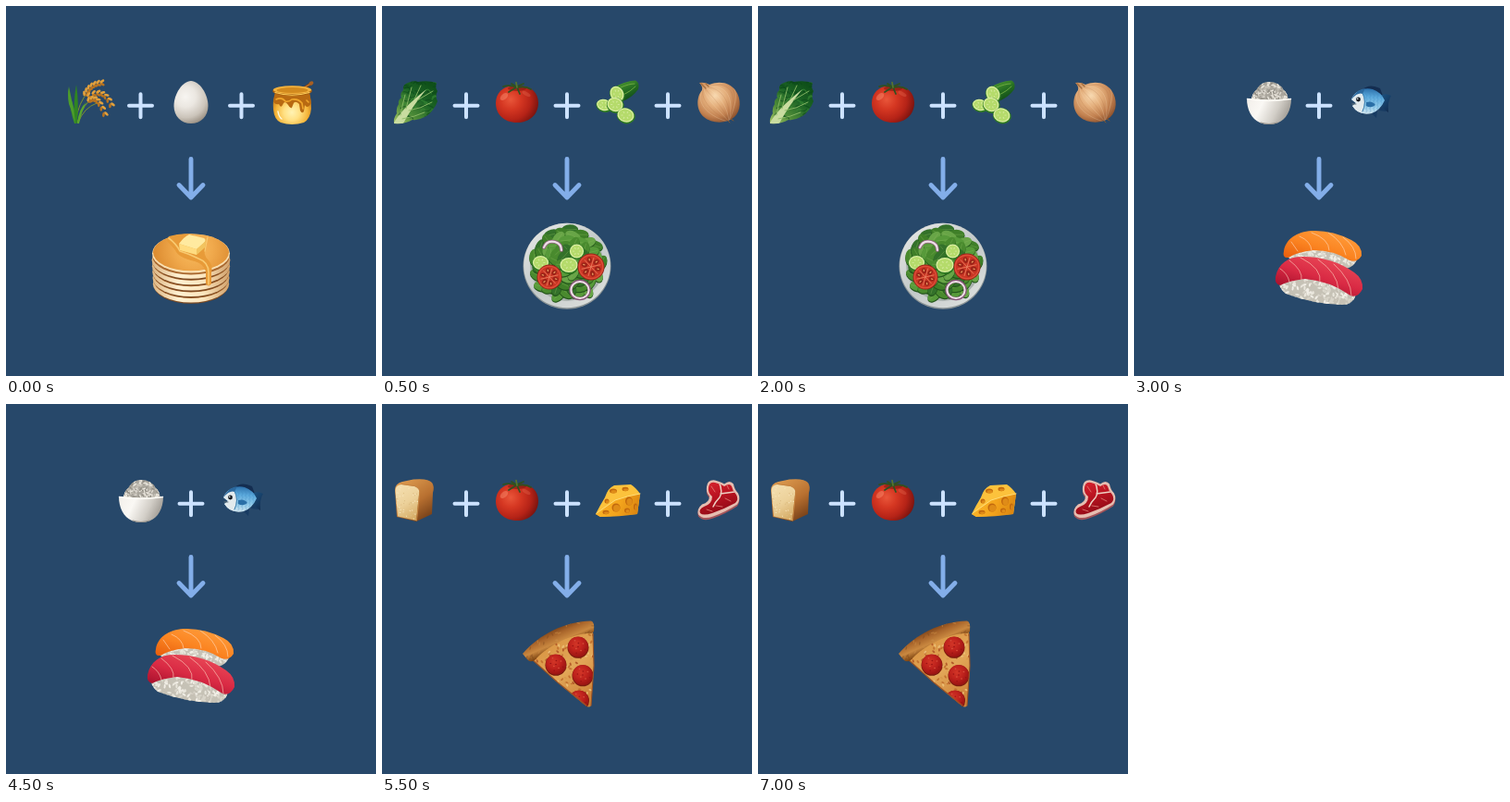
Recreate the animation shown at these times as an HTML page with a canvas. Size 400x400 px, loop 8 s.

```html
<!DOCTYPE html>
<html lang="en">
<head>
<meta charset="utf-8">
<title>Recipes</title>
<style>
html, body { margin: 0; width: 100%; height: 100%; overflow: hidden; background: #27486a; }
canvas { display: block; width: 400px; height: 400px; }
</style>
</head>
<body>
<canvas id="stage" width="400" height="400"></canvas>
<script>
const ctx = document.getElementById('stage').getContext('2d');
const TAU = Math.PI * 2;
let seed = 1;

function rnd(a = 0, b = 1) {
  seed = (seed * 16807) % 2147483647;
  return a + (b - a) * seed / 2147483647;
}

function addStops(g, colors) {
  colors.forEach((c, i) => g.addColorStop(i / (colors.length - 1), c));
  return g;
}
const linear = (x1, y1, x2, y2, ...c) => addStops(ctx.createLinearGradient(x1, y1, x2, y2), c);
const radial = (x, y, r, ...c) => addStops(ctx.createRadialGradient(x, y, 0, x, y, r), c);

function fill(d, color) {
  ctx.fillStyle = color;
  ctx.fill(new Path2D(d));
}

function line(d, color, width = 1) {
  ctx.strokeStyle = color;
  ctx.lineWidth = width;
  ctx.lineCap = ctx.lineJoin = 'round';
  ctx.stroke(new Path2D(d));
}

function oval(x, y, rx, ry, color, turn = 0) {
  ctx.beginPath();
  ctx.ellipse(x, y, rx, ry, turn, 0, TAU);
  ctx.fillStyle = color;
  ctx.fill();
}

function ring(x, y, rx, ry, color, width) {
  ctx.beginPath();
  ctx.ellipse(x, y, rx, ry, 0, 0, TAU);
  ctx.strokeStyle = color;
  ctx.lineWidth = width;
  ctx.stroke();
}

function inside(d, draw) {
  ctx.save();
  ctx.clip(new Path2D(d));
  draw();
  ctx.restore();
}

// Scatters small ovals over a box.
function grains(n, [x1, y1, x2, y2], rx, ry, colors) {
  for (let i = 0; i < n; i++) {
    oval(rnd(x1, x2), rnd(y1, y2), rx, ry, colors[i % colors.length], rnd(0, 3.1));
  }
}

function plus(x) {
  line(`M${x - 12.5} 107.8h25M${x} 95.3v25`, '#cce2ff', 4);
}

function arrow() {
  line('M200 165.5V206.5M187 193.5L200 207L213 193.5', '#83aee9', 4.9);
}

function wheat() {
  line('M75 126Q78 104 90 91M77 126Q83 106 96 97M78 126Q84 110 98 105', '#7d8f30', 1);
  fill('M74 127Q69 113 69 98Q75 110 76 127Z', '#3f9427');
  fill('M75 127Q72 106 76 85Q79 105 77 126Z', '#2f8521');
  fill('M77 127Q79 110 87 104Q82 113 79 127Z', '#58a72e');
  fill('M68 106Q66 96 68 87Q72 105 75 125Z', '#4d9d2b');
  const heads = [[86, 95, 91, 84, 104, 83], [90, 97, 106, 88, 114, 107], [90, 102, 99, 95, 107, 117]];
  for (const [x1, y1, cx, cy, x2, y2] of heads) {
    for (let i = 0; i <= 6; i++) {
      const t = i / 6, u = 1 - t;
      const x = u * u * x1 + 2 * u * t * cx + t * t * x2;
      const y = u * u * y1 + 2 * u * t * cy + t * t * y2;
      const turn = Math.atan2(u * (cy - y1) + t * (y2 - cy), u * (cx - x1) + t * (x2 - cx));
      const dx = -Math.sin(turn) * 1.6, dy = Math.cos(turn) * 1.6;
      oval(x + dx, y + dy, 2.7, 1.4, '#b87320', turn + 0.5);
      oval(x - dx, y - dy, 2.8, 1.4, '#e3a13c', turn - 0.5);
    }
  }
}

function egg() {
  const shell = 'M200 81C209 81 218.5 95 218.5 108C218.5 119.5 210.5 127 200 127C189.5 127 181.5 119.5 181.5 108C181.5 95 191 81 200 81Z';
  fill(shell, radial(194, 98, 34, '#f7f5f1', '#ebe7e1', '#cbc4ba', '#857a6c'));
}

function honey() {
  line('M317 92L330 83.5', '#7e4215', 3);
  line('M318 91L331 83', '#c17a30', 1.4);
  oval(330, 83.5, 2.6, 2, '#a85f22', -0.6);
  const pot = 'M291 94Q288 102 289 112Q290 123 297 126Q309 130 322 126Q329 122 330 111Q330 101 328 94Z';
  fill(pot, radial(309, 115, 26, '#fff3b4', '#ffe083', '#f5b438', '#b0620c'));
  fill('M291 94Q309 101 328 94L330 105Q326 112 323 107L322 114Q320 117 318 113L317 106Q313 102 311 105L309 110Q307 111 305 107Q301 101 299 107Q297 111 295 106Q291 107 289 103Z', '#b86a12');
  line('M292 101Q298 98 302 103Q306 104 309 101Q316 100 320 105L321 111M325 102L327 104', '#f0a62b', 1.6);
  oval(309.5, 92, 21.3, 5.4, '#a95f10');
  oval(309.5, 90.6, 20.6, 4.4, '#f3b23d');
  oval(309.5, 91, 17, 3, '#d28a1e');
  line('M291 93.5Q309 99 328 93.5', '#ffd05a', 1.2);
  line('M294 114Q295 120 298 122', '#fffbe0', 1.4);
}

function pancakes() {
  for (let i = 4; i >= 0; i--) {
    const y = 270 + i * 6.4, rx = 42 - i * 0.3;
    oval(200, y + 6.2, rx - 0.6, 20, '#7d4a22');
    oval(200, y + 4.8, rx + 0.4, 20, linear(158, 0, 242, 0, '#dcb583', '#fff1d2', '#fbe6bf', '#d0a06a'));
    oval(200, y + 0.8, rx - 0.4, 19.6, '#a9682f');
  }
  oval(200, 267.5, 42, 21, '#f9e0b2');
  oval(200, 266.3, 41, 20, radial(203, 262, 42, '#f8bd60', '#f0a94c', '#dd8d32'));
  fill('M176 249Q190 245 202 247L216 262Q212 268 219 275Q224 281 222 288V300Q219 305 216 300V287Q214 279 204 276Q186 272 183 264Q180 260 174 254Z', '#e89b38');
  line('M176 251Q184 257 188 265Q198 268 208 273Q219 277 219 288V301', '#f9ca70', 1.6);
  line('M218 250Q216 259 215 265', '#f9ca70', 1.2);
  fill('M187 258L196 248L216 252L215 261L206 269L188 264Z', '#eab653');
  fill('M187 257Q193 249 198 247L214 251Q217 253 214 256L206 263Z', '#ffeaa0');
  fill('M187 257L206 263V269L188 264Z', '#ffdc80');
  fill('M206 263L216 254L215 261L206 269Z', '#f2c45f');
}

function lettuce() {
  const leaf = 'M13 127Q12 122 16 116Q15 111 18 106Q17 102 21 99Q19 94 23 91Q22 85 28 83Q34 80 39 82Q49 80 59 83Q57 88 60 92Q57 98 60 103Q58 109 55 112Q52 117 46 120Q39 124 33 123Q25 128 13 127Z';
  fill(leaf, linear(14, 127, 50, 83, '#a5c468', '#4c8a37', '#1c6425', '#0f5019'));
  inside(leaf, () => {
    for (let i = 0; i < 55; i++) {
      const x = rnd(18, 58), y = rnd(82, 120);
      line(`M${x} ${y}q3 ${rnd(-5, 2)} 6 ${rnd(-3, 3)}`, i % 3 ? '#0b471a88' : '#3d903899', 1.3);
    }
    fill('M12 128Q20 112 48 90Q33 108 23 127Z', '#c9dca0');
    line('M20 118Q22 107 25 96M26 111Q29 99 32 88M35 101L42 86M22 122Q35 120 46 115M29 113Q42 111 54 104M38 102L55 92', '#8dba68', 0.9);
  });
}

function tomato() {
  const body = 'M146 87.5C158 84 169 92 169 104.500C169 118 159 126 146 126C132 126 123 117 123 105C123 92 134 84 146 87.5Z';
  fill(body, radial(139, 101, 33, '#e9563a', '#d53722', '#b52317', '#6d100d'));
  oval(132, 98, 5, 3, '#ff9c7a66', -0.7);
  oval(156, 95, 5, 2, '#f5806044', 0.5);
  oval(146, 89, 10, 3, '#76160f88');
  line('M146 88Q138 85 131 87M145 88L137 93M146 88L149 95M147 88Q155 86 161 90M146 87L153 84M145 87L140 84', '#2f5120', 1.8);
  line('M146 88L145 82.5', '#58752f', 1.7);
}

function slice(x, y, rx, ry = rx, turn = 0) {
  oval(x + 0.3, y + 0.8, rx, ry, '#2f7a22', turn);
  oval(x, y, rx - 0.9, ry - 0.9, '#dcefa2', turn);
  oval(x, y, rx - 2.2, ry - 2.2, '#b5db6b', turn);
  for (let i = 0; i < 6; i++) {
    const a = i * TAU / 6;
    oval(x + Math.cos(a) * rx * 0.4, y + Math.sin(a) * ry * 0.4, 1.2, 0.6, '#d3e99c', a);
  }
}

function cucumber() {
  fill('M249 89Q262 81 274 80.5Q279 83 277 90Q271 99 258 104Z', linear(258, 82, 267, 101, '#4c982f', '#266f22', '#124f18'));
  line('M258 88Q267 84 273 84M261 96Q269 92 274 87', '#72ad45', 0.9);
  slice(254, 95, 8, 9.5, -0.5);
  slice(240, 107, 9, 7, 0.25);
  slice(252, 106.5, 9.5, 8.5, 0.3);
  slice(263.5, 118, 10, 8.5, 0.25);
}

function onion() {
  const body = 'M343 83Q349 82 354 85C366 80 377 84 382 91C389 101 388 113 381 120C372 128 356 127 348 120C339 112 340 98 346 91Q347 87 343 83Z';
  fill(body, radial(360, 97, 34, '#f8d9b0', '#e4af7c', '#c28150', '#784020'));
  inside(body, () => {
    for (let i = -4; i <= 5; i++) {
      line(`M348 88C${359 + i * 6} ${90 - i * 4} ${374 + i * 4} ${106 - i * 4} 375 125`, i % 2 ? '#a0653b44' : '#fbe1bd55', 0.7);
    }
  });
  line('M345 84L350 89M350 84L353 87', '#a46d3c', 1.2);
  line('M374 124l2 2M377 122l3 2', '#83572f', 1);
}

function tomatoSlice(x, y, r) {
  oval(x, y, r, r, '#9c2118');
  oval(x, y, r - 0.9, r - 0.9, '#dd4f38');
  oval(x, y, r - 2.4, r - 2.4, '#c93524');
  for (let i = 0; i < 6; i++) {
    const a = i * TAU / 6 + 0.3;
    oval(x + Math.cos(a) * r * 0.52, y + Math.sin(a) * r * 0.52, r * 0.23, r * 0.17, '#9b2318', a);
    oval(x + Math.cos(a) * r * 0.55, y + Math.sin(a) * r * 0.55, 1.4, 0.7, '#e99a5f', a);
    line(`M${x} ${y}l${Math.cos(a + 0.52) * r * 0.7} ${Math.sin(a + 0.52) * r * 0.7}`, '#e97c5c', 0.9);
  }
}

function salad() {
  oval(200, 281.3, 47.5, 46.5, '#8b9496');
  oval(200, 280.5, 46.8, 45.8, linear(165, 240, 232, 324, '#e4e6e4', '#c2c8c8', '#dde0de'));
  oval(200, 280, 40, 39, '#a8b1ad');
  oval(200, 279, 37, 37, '#376f24');
  const greens = ['#3f7f28', '#579a3a', '#33712a', '#68a547', '#498a2e'];
  for (let i = 0; i < 65; i++) {
    const a = i * 2.4, d = 37 * Math.sqrt(1 - i / 65);
    const x = 200 + Math.cos(a) * d, y = 278 + Math.sin(a) * d;
    const turn = rnd(0, TAU), dx = Math.cos(turn) * 7, dy = Math.sin(turn) * 7;
    oval(x, y + 1.2, 9, 5.5, '#24561c', turn);
    oval(x, y, 9, 5.4, greens[i % 5], turn);
    line(`M${x - dx} ${y - dy}L${x + dx} ${y + dy}`, '#86b65a77', 0.8);
  }
  line('M175 261Q178 253 187 255Q194 257 194 264', '#996589', 3.7);
  line('M175 261Q178 253 187 255Q194 257 194 264', '#eee1e8', 2.1);
  slice(210.5, 265, 8.5);
  slice(171.5, 277.5, 9.5, 8.5);
  slice(202, 280, 10.5, 9);
  tomatoSlice(181, 293, 13.5);
  tomatoSlice(226, 282, 14.5);
  ring(214, 307, 10, 9.5, '#88557a', 3.5);
  ring(214, 307, 9.6, 9, '#eee1e7', 2);
}

function riceBowl() {
  const mound = 'M127 102Q127 95 132 91Q137 82 146 82Q157 82 162 91Q166 94 167 102Z';
  fill(mound, '#aaa69d');
  inside(mound, () => grains(180, [127, 82, 167, 103], 2.1, 0.75, ['#dedad1', '#bfbab0', '#ece8df', '#8f8b82']));
  fill('M122 100Q146 103 170 100C170 113 164 123 156 126Q146 130 136 126C127 122 122 112 122 100Z',
    linear(122, 100, 169, 122, '#f2efea', '#faf8f4', '#d2cec7', '#938e87'));
  line('M122.5 100.5Q146 104 169.5 100.5', '#fffdf8', 1.4);
  line('M137 126Q146 129 155 126', '#9b968f', 1.2);
}

function fish() {
  fill('M246 91Q254 83 266 89L269 97Z', '#142d50');
  fill('M264 98Q271 93 278 97Q274 103 275 115Q269 112 265 105Z', linear(264, 98, 278, 111, '#1c5382', '#122d50'));
  fill('M255 114L262 121L263 113ZM266 108L273 114L265 113ZM244 113L247 118L252 114Z', '#183b62');
  const body = 'M235 101C240 90 250 88 258 90Q267 93 271 102Q266 113 257 116Q243 119 236 108L240 105Z';
  fill(body, linear(252, 88, 250, 118, '#2568a4', '#5ba9dc', '#90caea', '#dceaf0'));
  inside(body, () => {
    fill('M233 98Q240 91 247 94Q252 104 246 116H233Z', '#e2eaed');
    fill('M235 98Q242 88 250 89L247 95Q242 93 235 101Z', '#2c699e');
    for (let x = 251; x < 268; x += 4) for (let y = 95; y < 112; y += 4) {
      line(`M${x} ${y}q2.5 2 0 4`, '#367fb866', 0.7);
    }
  });
  line('M247 94Q252 104 247 114', '#397cad', 1);
  fill('M251 104Q258 102 261 107Q256 111 251 108Z', '#2a6fa7');
  oval(242.5, 101, 2.4, 2.4, '#111820');
  oval(241.8, 100.2, 0.8, 0.8, '#fff');
  line('M236 106L240 106', '#64747d', 1);
}

function sushiPiece(rice, top, box, colors, veins) {
  fill(rice, '#c6c2b6');
  inside(rice, () => grains(280, box, 2.4, 1.1, ['#e9e6dc', '#d9d5ca', '#f1eee6', '#c6c1b5']));
  fill(top, linear(box[0] + 35, box[1] - 25, box[0] + 22, box[1] + 19, ...colors));
  inside(top, () => line(veins, '#ffe0c8a0', 0.9));
}

function sushi() {
  sushiPiece('M165 262Q164 270 171 276L226 284Q238 284 242 271L235 260Z',
    'M162 265C164 252 176 244 192 243Q214 242 235 253Q247 259 246 270Q241 278 233 275Q216 264 194 264Q176 266 167 272Q160 273 162 265Z',
    [163, 261, 243, 286], ['#ff9d3c', '#fb8421', '#e75b0b'],
    'M170 255L177 265M179 249Q191 254 192 264M192 245Q211 252 211 264M210 245Q226 255 229 269M226 250Q240 260 240 273');
  sushiPiece('M156 291Q155 304 164 311Q193 322 225 323Q238 323 240 310L234 297Z',
    'M153 293C156 278 167 271 182 271Q214 271 238 288Q248 295 247 306Q242 316 234 313Q211 297 185 295Q167 297 158 302Q152 301 153 293Z',
    [155, 291, 241, 324], ['#e94756', '#d92a44', '#a50f2b'],
    'M158 284Q166 289 168 298M168 275Q183 286 181 296M180 272Q204 284 201 299M199 274Q220 289 221 306M216 279Q235 296 235 313');
}

function bread() {
  fill('M14 93Q14 86 22 84L34 81.5Q50 80 54 85Q57 89 55 96L54 119L37 127L16 122Z', linear(30, 82, 56, 122, '#d8954b', '#b87030', '#6f3b16'));
  const crumb = 'M14.500 94Q14 88 21 87L35 89Q42 91 40 98L37 126L17 121.5Z';
  fill(crumb, linear(16, 88, 39, 124, '#f4dfb0', '#ecd19a', '#d3a75f'));
  inside(crumb, () => grains(70, [15, 87, 41, 125], 0.8, 0.5, ['#ddbd83', '#f8e6bd']));
  line('M21 86.5L35 88.5Q42 91 40.5 98L37.5 126', '#c58442', 1);
}

function cheese() {
  fill('M231 119Q236 109 241 101Q244 91 251 88L269 87Q274 90 279 97L276 119L236 122Z', '#fcc23c');
  fill('M231 119L252 104Q266 99 279 97L276 119Q257 122 236 122Z', linear(234, 104, 276, 122, '#fbb62a', '#f3a41c', '#d9830f'));
  line('M232 118L252 104Q266 99 279 97', '#ffdd78', 1);
  const holes = [[250, 94, 4, 2.5], [263, 92, 3.5, 2.2], [267, 105, 4, 4.5], [253, 112, 4.5, 4.5], [265, 115, 3, 2.6], [242, 117, 3.5, 2.2], [274, 111, 2, 3.5], [243, 105, 2.5, 2.5]];
  for (const [x, y, rx, ry] of holes) {
    oval(x, y, rx, ry, '#c2690e');
    oval(x + 0.6, y + 0.8, rx - 0.9, ry - 0.8, '#df8c18');
  }
}

function steak() {
  const rim = 'M351 90Q352 82 360 83Q367 85 370 87Q376 82 380 87Q381 93 385 97Q388 103 384 109Q372 117 358 122Q347 126 342 120Q340 114 346 109Q354 107 354 100Q350 96 351 90Z';
  ctx.save();
  ctx.translate(0, 1.6);
  fill(rim, '#a4545a');
  ctx.translate(0, -2.2);
  fill(rim, '#e6bdb0');
  ctx.restore();
  const meat = 'M353 90Q354 84 360 85Q367 87 370 89Q376 85 378 89Q379 94 383 98Q386 103 382 107Q371 113 357 118Q347 121 344 118Q342 114 348 111Q357 108 357 100Q352 96 353 90Z';
  fill(meat, linear(360, 86, 370, 116, '#d01f2b', '#b5121f', '#920b17'));
  inside(meat, () => {
    line('M364 84Q369 94 365 101Q360 106 358 111M366 97L381 95', '#eed0c3', 1.5);
    line('M351 114L357 116M361 110L368 111M371 102L377 105M373 88L375 92M356 89L360 95', '#e28279', 0.8);
  });
}

function pepperoni(x, y, r) {
  oval(x, y + 0.8, r, r, '#7c1c0e');
  oval(x, y, r - 0.5, r - 0.5, radial(x - 2, y - 3, r * 1.2, '#d23627', '#c0231d', '#9c1413'));
  for (let i = 0; i < 9; i++) {
    const a = i * 2.4, d = r * 0.75 * Math.sqrt(i / 9);
    oval(x + Math.cos(a) * d, y + Math.sin(a) * d, 0.9, 0.7, i % 2 ? '#d9503c' : '#991313');
  }
}

function pizza() {
  const base = 'M160 274Q190 249 228 246L229 283L226 326Q224 329 220 326L190 301Z';
  fill(base, linear(180, 255, 224, 318, '#d99543', '#e2a758', '#cd8238'));
  inside(base, () => {
    grains(170, [160, 248, 230, 327], 1.8, 1, ['#ebbd74', '#c37330', '#d8994c', '#b45c2a']);
    for (const [x, y, r] of [[212, 262.5, 11.5], [188, 281.5, 11.5], [217, 293, 11.5], [213, 320, 11]]) pepperoni(x, y, r);
  });
  line('M161 275L190 301L221 326M228 248L229 283L226 326', '#9c5425', 1.1);
  const crust = 'M152 270C170 249 198 235 226 234.5Q230 235 229 246Q227 249 222 248C200 250 178 263 165 277Q160 280 157 276Z';
  fill(crust, linear(183, 242, 193, 265, '#6f3a14', '#a8642a', '#c98840', '#78400f'));
  inside(crust, () => grains(60, [153, 235, 229, 278], 2, 0.7, ['#c98c4788', '#7d471c77']));
}

const scenes = [
  { start: 0, pluses: [145.5, 254.5], items: [wheat, egg, honey, pancakes] },
  { start: 500, pluses: [91, 200, 309], items: [lettuce, tomato, cucumber, onion, salad] },
  { start: 3000, pluses: [200], items: [riceBowl, fish, sushi] },
  { start: 5500, pluses: [91, 200, 309], items: [bread, tomato, cheese, steak, pizza] }
];

let shown = null;

function draw(scene) {
  seed = 41;
  ctx.fillStyle = '#27486a';
  ctx.fillRect(0, 0, 400, 400);
  scene.pluses.forEach(plus);
  arrow();
  scene.items.forEach(item => item());
}

function tick() {
  const t = performance.now() % 8000;
  const scene = scenes.filter(s => s.start <= t).pop();
  if (scene !== shown) draw(shown = scene);
  requestAnimationFrame(tick);
}
tick();
</script>
</body>
</html>
```
